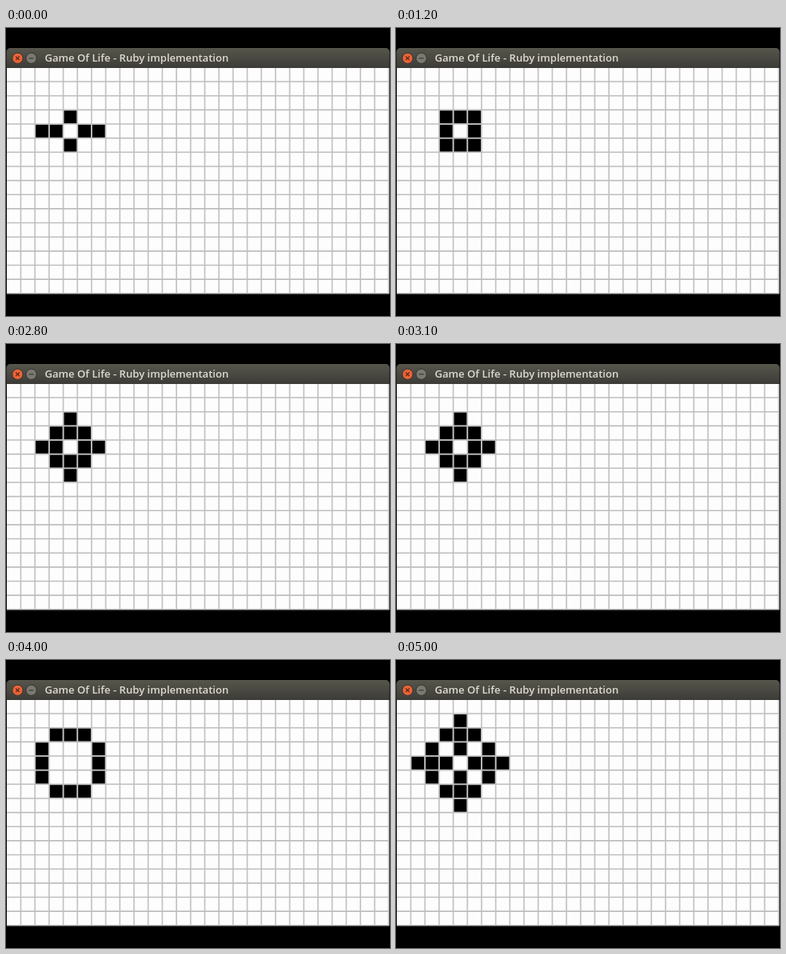
These frames come from a looping animation (480 by 360 pixels, 5.1 s). An HTML page with a canvas:

```html
<!DOCTYPE html>
<html lang="en">
<head>
<meta charset="utf-8">
<title>Game Of Life</title>
<style>
  html, body { margin: 0; width: 100%; height: 100%; overflow: hidden; background: #000; }
  canvas { display: block; }
</style>
</head>
<body>
<canvas id="stage" width="480" height="360"></canvas>
<script>
const ctx = document.getElementById('stage').getContext('2d');
const LOOP = 5100;
const STEPS = [800, 1800, 2800, 3700, 4700];
const COLS = 27, ROWS = 16;
const colX = c => 0.8 + 17.69 * c;
const rowY = r => 49.4 + 17.65 * r;

function nextGeneration(live) {
  const next = new Set();
  for (let r = 0; r < ROWS; r++) {
    for (let c = 0; c < COLS; c++) {
      let count = 0;
      for (let dy = -1; dy <= 1; dy++)
        for (let dx = -1; dx <= 1; dx++)
          if ((dx || dy) && live.has(`${c + dx},${r + dy}`)) count++;
      const key = `${c},${r}`;
      if (count === 3 || (count === 2 && live.has(key))) next.add(key);
    }
  }
  return next;
}

const generations = [new Set(['4,3', '2,4', '3,4', '5,4', '6,4', '4,5'])];
STEPS.forEach(() => generations.push(nextGeneration(generations.at(-1))));

function rect(color, x, y, w, h) {
  ctx.fillStyle = color;
  ctx.fillRect(x, y, w, h);
}

function line(color, width, x1, y1, x2, y2) {
  ctx.strokeStyle = color;
  ctx.lineWidth = width;
  ctx.beginPath();
  ctx.moveTo(x1, y1);
  ctx.lineTo(x2, y2);
  ctx.stroke();
}

function button(x, color) {
  ctx.beginPath();
  ctx.arc(x, 37.8, 6.6, 0, 7);
  ctx.fillStyle = color;
  ctx.fill();
  ctx.strokeStyle = '#33322d';
  ctx.lineWidth = 0.9;
  ctx.stroke();
}

function drawTitleBar() {
  const shade = ctx.createLinearGradient(0, 25, 0, 50);
  shade.addColorStop(0, '#57564c');
  shade.addColorStop(1, '#3c3b37');
  ctx.fillStyle = shade;
  ctx.beginPath();
  ctx.roundRect(0.5, 25, 479, 25, [5, 5, 0, 0]);
  ctx.fill();

  button(14.5, '#ea6438');
  line('#5a2413', 1.2, 12.2, 35.5, 16.8, 40.1);
  line('#5a2413', 1.2, 16.8, 35.5, 12.2, 40.1);
  button(31.6, '#7b7970');
  line('#3a3934', 1.2, 28.6, 37.8, 34.6, 37.8);

  ctx.font = '600 13.1px "Open Sans", "Noto Sans", sans-serif';
  ctx.fillStyle = '#dfdbd2';
  ctx.fillText('Game Of Life - Ruby implementation', 48.5, 42.4);
}

function drawGrid(live) {
  rect('#fdfdfd', 1, 50, 478, 282);
  for (let c = 1; c <= COLS; c++) line('#c3c3c3', 1.7, colX(c), 50, colX(c), 332);
  for (let r = 1; r <= ROWS; r++) line('#bebebe', 1.6, 1, rowY(r), 479, rowY(r));
  for (const key of live) {
    const [c, r] = key.split(',').map(Number);
    rect('#000', colX(c) + 0.9, rowY(r) + 0.9, 15.9, 15.9);
  }
}

function draw(now) {
  const t = now % LOOP;
  rect('#000', 0, 0, 480, 360);
  drawTitleBar();
  drawGrid(generations[STEPS.filter(s => t >= s).length]);
}

const start = performance.now();
function frame() {
  draw(performance.now() - start);
  requestAnimationFrame(frame);
}
frame();
</script>
</body>
</html>
```
